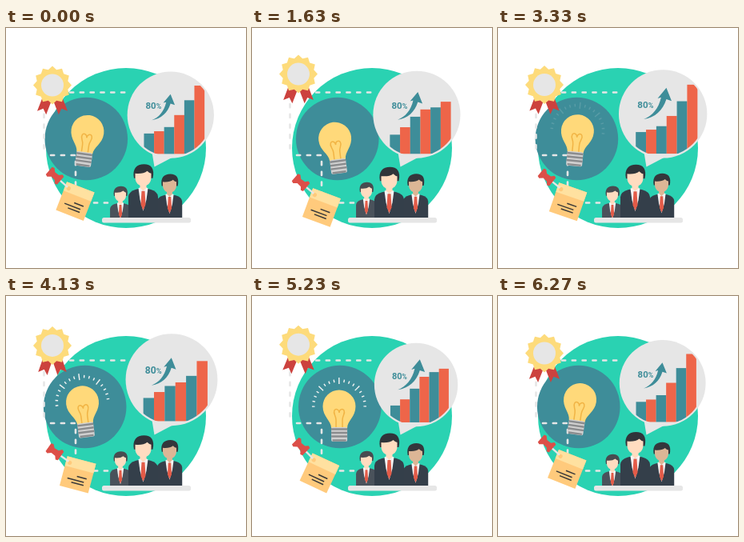
Animation, 300 px wide and 300 px high, one loop 6.31 s. Source, as an HTML page:

```html
<!DOCTYPE html>
<html lang="en">
<head>
<meta charset="utf-8">
<title>Business idea</title>
<style>
  html, body { margin: 0; width: 100%; height: 100%; overflow: hidden; background: #fff; }
  svg { display: block; width: 100vw; height: 100vh; }
</style>
</head>
<body>
<svg viewBox="0 0 300 300">
  <defs>
    <clipPath id="chartClip"><circle cx="205" cy="111" r="50"/></clipPath>
    <clipPath id="floorClip"><rect x="100" y="150" width="140" height="89"/></clipPath>
  </defs>

  <circle cx="150" cy="150" r="100" fill="#2ad2b2"/>
  <circle id="disc" cy="138.500" r="51.800" fill="#3e8d99"/>

  <g fill="none" stroke="#e6e6e6" stroke-width="2.600" stroke-linecap="round" stroke-dasharray="4.200 8.600">
    <path d="M80 80.500H156"/>
    <path d="M47.500 95V159"/>
    <path d="M56 159H87"/>
    <path d="M87 167V206"/>
    <path d="M110 218.500H135"/>
  </g>

  <g id="bulb">
    <g id="rays" stroke="#f4f4f4" stroke-width="1.400"></g>
    <path d="M-10 27C-10 18 -20.500 13 -20.500 0A20.500 20.500 0 0 1 20.500 0C20.500 13 10 18 10 27Z" fill="#ffd97a"/>
    <path d="M-4 26V17C-4 11 -8 9 -6 5C-4 2 0 4 0 8C0 4 4 2 6 5C8 9 4 11 4 17V26" fill="none" stroke="#f1b445" stroke-width="1.500"/>
    <rect x="-10" y="26" width="20" height="18" rx="2" fill="#d0d0d0"/>
    <path d="M-10 28.500H10M-10 33H10M-10 37.500H10M-8.500 42.500H8.500" stroke="#8a8c8e" stroke-width="2.400"/>
  </g>

  <g id="badge">
    <g id="ribbons" fill="#cc423e"></g>
    <polygon id="rosette" fill="#fddb7b"/>
    <circle r="14" fill="#e6e6e6"/>
  </g>

  <g id="bubble">
    <circle cx="205" cy="111.200" r="52" fill="#e6e6e6"/>
    <path d="M182 152L185.500 173.500L213 159Z" fill="#e6e6e6"/>
    <g id="bars" clip-path="url(#chartClip)"></g>
    <g id="arrow" fill="#3e8d99">
      <path d="M0 0C10 -4 17 -12 20 -25L16 -24L26 -36L32 -21L26 -23C22 -10 13 -2 0 0Z"/>
    </g>
    <text x="175" y="104.300" fill="#3e8d99" font-family="Roboto, sans-serif" font-weight="700" font-size="11">80<tspan font-size="8.500">%</tspan></text>
  </g>

  <g id="people" clip-path="url(#floorClip)"></g>
  <rect x="120" y="237" width="111" height="6.500" rx="2.500" fill="#e6e6e6"/>

  <g id="note">
    <rect x="15.500" y="1" width="37" height="38" fill="#ffca7c"/>
    <rect x="15.500" y="1" width="37" height="12" fill="#ffe1a0"/>
    <path d="M33.500 22.200H46M22.500 27.200H43.700M28.500 31H44.300" stroke="#3a3a3a" stroke-width="1.500"/>
    <circle cx="20.500" cy="8" r="2.600" fill="#ffca7c"/>
    <g transform="rotate(20)">
      <path d="M6 0H20" stroke="#e6e6e6" stroke-width="2.400"/>
      <path d="M-11 -6L-8 -7L-4 -3.500L2 -4L5 -7.500L8 -6.500V6.500L5 7.500L2 4L-4 3.500L-8 7L-11 6Z" fill="#dc4f48"/>
    </g>
  </g>
</svg>

<script>
const LOOP = 6310;
const CYCLE = LOOP / 2;
const $ = id => document.getElementById(id);

function add(parent, tag, attrs) {
  const node = document.createElementNS("http://www.w3.org/2000/svg", tag);
  for (const key in attrs) node.setAttribute(key, attrs[key]);
  return parent.appendChild(node);
}

function place(node, transform) {
  node.setAttribute("transform", transform);
}

// Rosette with twelve points
$("rosette").setAttribute("points", Array.from({ length: 24 }, (_, i) => {
  const r = i % 2 ? 20 : 24, a = i * Math.PI / 12;
  return `${r * Math.sin(a)},${-r * Math.cos(a)}`;
}).join(" "));

const ribbons = [-1, 1].map(side => ({
  side,
  node: add($("ribbons"), "path", { d: "M-6 16H6V37L0 31.500L-6 37Z" })
}));

for (let i = 0; i <= 16; i++) {
  const long = i === 4 || i === 8 || i === 12;
  add($("rays"), "path", {
    d: long ? "M0 -28V-36" : "M0 -30.500V-34",
    transform: `rotate(${(i - 8) * 11.25})`
  });
}

// Bar tops: middle height, swing, time of the lowest top
const bars = [
  [134.2, 3, 2250], [128.4, 3.6, 2730], [119.8, 6, 50],
  [108.6, 7.5, 600], [98.5, 8.5, 1100], [86, 10, 1560]
].map(([mid, swing, peak], i) => ({
  mid, swing, peak,
  node: add($("bars"), "rect", {
    x: 173 + 12.1 * i, width: 12.2, fill: i % 2 ? "#ee6549" : "#3e8d99"
  })
}));

function makePerson({ skin, suit, hair, ...pose }) {
  const node = add($("people"), "g", {});
  const shape = (fill, d) => add(node, "path", { fill, d });
  shape(suit, "M-18.500 80V40Q-18 33.500 -9 31L0 29L9 31Q18 33.500 18.500 40V80Z");
  shape("#f4f4f4", "M-6 29.500L0 27L6 29.500L4 44L0 58L-4 44Z");
  shape("#e35b48", "M-2 33H2L3 50L0 57L-3 50Z");
  shape(skin, "M-4 22H4V29L0 33L-4 29Z");
  shape(hair, "M-11.500 17C-14 5 -8 -0.500 1 -0.500C10 -0.500 14.500 5 12 17Z");
  shape(skin, "M-10 11Q0 12 5 8Q8 11 10 11V16C10 23 5 27 0 27C-5 27 -10 23 -10 16Z");
  return { node, ...pose };
}

const people = [
  { x: 143, y: 195.5, size: 0.7, bob: 2.5, peak: 0, skin: "#ffdcc0", suit: "#4a525b", hair: "#484b50" },
  { x: 204.5, y: 182.7, size: 0.85, bob: -2.4, peak: 849, skin: "#dcb696", suit: "#353f4a", hair: "#34373c" },
  { x: 171.5, y: 172.5, size: 1, bob: 2.5, peak: 1200, skin: "#ffdcc0", suit: "#343f4a", hair: "#30343a" }
].map(makePerson);

function draw(t) {
  const wave = (peak, period = CYCLE) => Math.cos(2 * Math.PI * (t - peak) / period);
  const pulse = wave(849);

  const discX = 103.2 + 6.7 * wave(2140);
  $("disc").setAttribute("cx", discX);

  const tilt = -9.3 * wave(1300);
  place($("bulb"), `translate(${discX - 0.8} ${151.5 + 5 * wave(1850)}) rotate(${tilt}) translate(0 -18)`);
  const glow = 0.5 - 0.5 * wave(0, LOOP / 4);
  $("rays").setAttribute("opacity", Math.min(1, Math.max(0, 1.5 * glow - 0.03)));

  place($("badge"), `translate(58 ${64.5 + 7 * wave(0)})`);
  for (const { side, node } of ribbons) place(node, `rotate(${-side * (21 - 2 * pulse)})`);

  place($("bubble"), `translate(186 173) scale(${1.048 + 0.058 * pulse}) translate(-186 -173)`);
  for (const bar of bars) {
    const top = bar.mid + bar.swing * wave(bar.peak);
    bar.node.setAttribute("y", top);
    bar.node.setAttribute("height", 158 - top);
  }
  place($("arrow"), `translate(182.3 117.500) scale(${0.96 - 0.095 * wave(-80, LOOP / 3)})`);

  place($("note"), `translate(62 ${190 + 6 * wave(1200)}) rotate(${20.5 - 5.8 * pulse})`);

  for (const p of people) {
    place(p.node, `translate(${p.x} ${p.y + p.bob * wave(p.peak)}) scale(${p.size})`);
  }
}

const start = performance.now();
function tick() {
  draw((performance.now() - start) % LOOP);
  requestAnimationFrame(tick);
}
tick();
</script>
</body>
</html>
```
